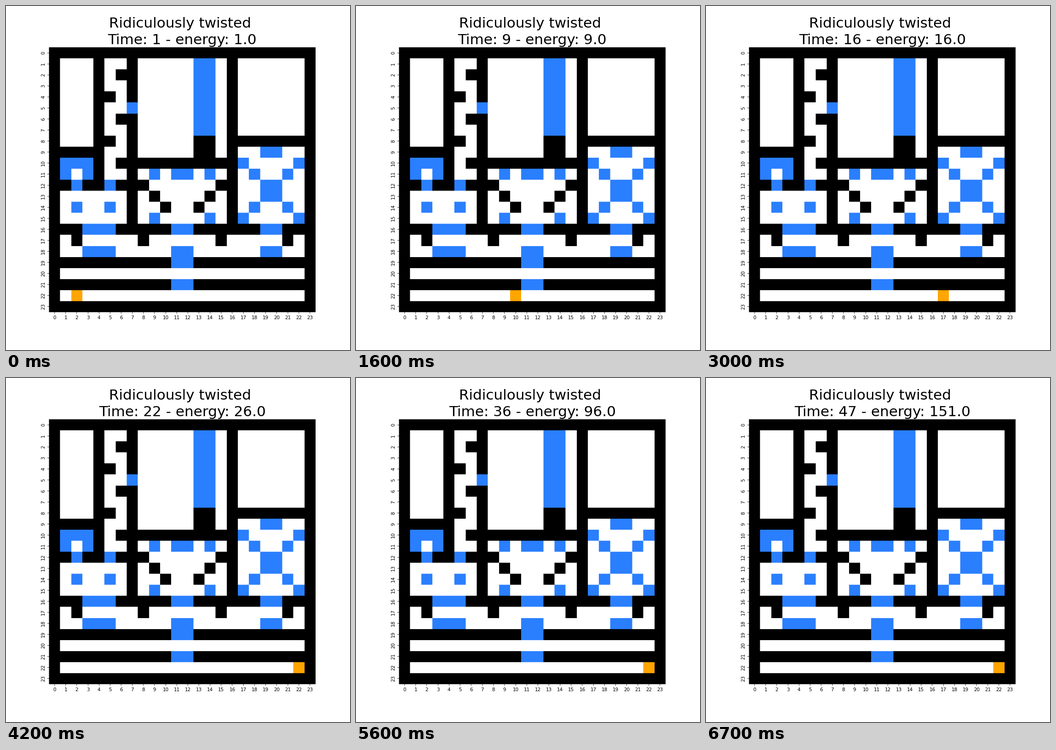
Animation, 748 px wide and 748 px high, one loop 6.8 s. Source, as a matplotlib script:

```python
import numpy as np
import matplotlib.pyplot as plt
from matplotlib.animation import FuncAnimation

SIZE, UNITS = 748, 1000    # stage pixels and layout units per side
INCHES = 10
INTERVAL, FRAMES = 100, 68
SLOW_FRAMES = 42           # each step lasts two frames until here
LAST_COL, ROW = 22, 22

LEFT, RIGHT, TOP, BOTTOM = 125, 900, 120, 890
TICK, LABEL_GAP = 5, 9.7
HEADING_Y, COUNTER_Y = 62.6, 110.8

WALL = "#" * 24
OPEN = "#" + "." * 22 + "#"
ROOM = "#...#..#.....bb.#......#"
PEG_RIGHT = "#...#.##.....bb.#......#"
PEG_LEFT = "#...##.#.....bb.#......#"
GATE = "###########bb###########"

MAZE = [
    WALL,
    ROOM,
    PEG_RIGHT,
    ROOM,
    PEG_LEFT,
    "#...#..b.....bb.#......#",
    PEG_RIGHT,
    ROOM,
    "#...##.#.....##.########",
    "#####..#.....##.#..bb..#",
    "#bbb#.###########b....b#",
    "#b.b#..#.b.bb.b.#.b..b.#",
    "##b##b###......##..bb..#",
    "#......#.#....#.#..bb..#",
    "#.b..b.#..#..#..#.b..b.#",
    "#......#.b....b.#b....b#",
    "###bbb#####bb######bb###",
    "#.#.....#......#.....#.#",
    "#..bbb.....bb......bb..#",
    GATE,
    OPEN,
    GATE,
    OPEN,
    WALL,
]
COUNT = len(MAZE)
COLORS = {".": (255, 255, 255), "#": (0, 0, 0), "b": (42, 127, 255)}
ORANGE = (255, 165, 0)


def cell_edges(start, stop):
    return np.floor(np.linspace(start, stop, COUNT + 1) + 0.5).astype(int)


def cell_centers(start, stop):
    return start + (np.arange(COUNT) + 0.5) * (stop - start) / COUNT


x_edges, y_edges = cell_edges(LEFT, RIGHT), cell_edges(TOP, BOTTOM)
x_centers, y_centers = cell_centers(LEFT, RIGHT), cell_centers(TOP, BOTTOM)


def paint_cell(canvas, row, col, color):
    canvas[y_edges[row]:y_edges[row + 1], x_edges[col]:x_edges[col + 1]] = color


board = np.full((UNITS, UNITS, 3), 255, dtype=np.uint8)
for row, line in enumerate(MAZE):
    for col, symbol in enumerate(line):
        paint_cell(board, row, col, COLORS[symbol])
board[BOTTOM:BOTTOM + TICK, x_centers.astype(int)] = 0
board[y_centers.astype(int), LEFT - TICK:LEFT] = 0

plt.rcParams["font.family"] = "DejaVu Sans"
fig = plt.figure(figsize=(INCHES, INCHES), dpi=SIZE / INCHES)
ax = fig.add_axes([0, 0, 1, 1])
ax.axis("off")
# Smooth resampling keeps the cell edges at fractions of a pixel.
image = ax.imshow(board, extent=(0, UNITS, UNITS, 0), aspect="auto",
                  interpolation="hanning")

for i in range(COUNT):
    ax.text(x_centers[i], BOTTOM + LABEL_GAP, i, fontsize=10,
            ha="center", va="top")
    ax.text(LEFT - LABEL_GAP, y_centers[i], i, fontsize=10,
            ha="right", va="center", rotation="vertical")

middle = (LEFT + RIGHT) / 2
ax.text(middle, HEADING_Y, "Ridiculously twisted ", fontsize=30, ha="center")
counter = ax.text(middle, COUNTER_Y, "", fontsize=30, ha="center")


def step_at(frame):
    if frame < SLOW_FRAMES:
        return frame // 2 + 1
    return frame - SLOW_FRAMES // 2 + 1


def update(frame):
    time = step_at(frame)
    # Once the walker reaches the wall, every step costs five.
    energy = time + 4 * max(0, time - LAST_COL + 1)
    canvas = board.copy()
    paint_cell(canvas, ROW, min(time + 1, LAST_COL), ORANGE)
    image.set_data(canvas)
    counter.set_text(f"Time: {time} - energy: {energy:.1f}")
    return image, counter


anim = FuncAnimation(fig, update, frames=FRAMES, interval=INTERVAL,
                     repeat=True, repeat_delay=0)
plt.show()
```
